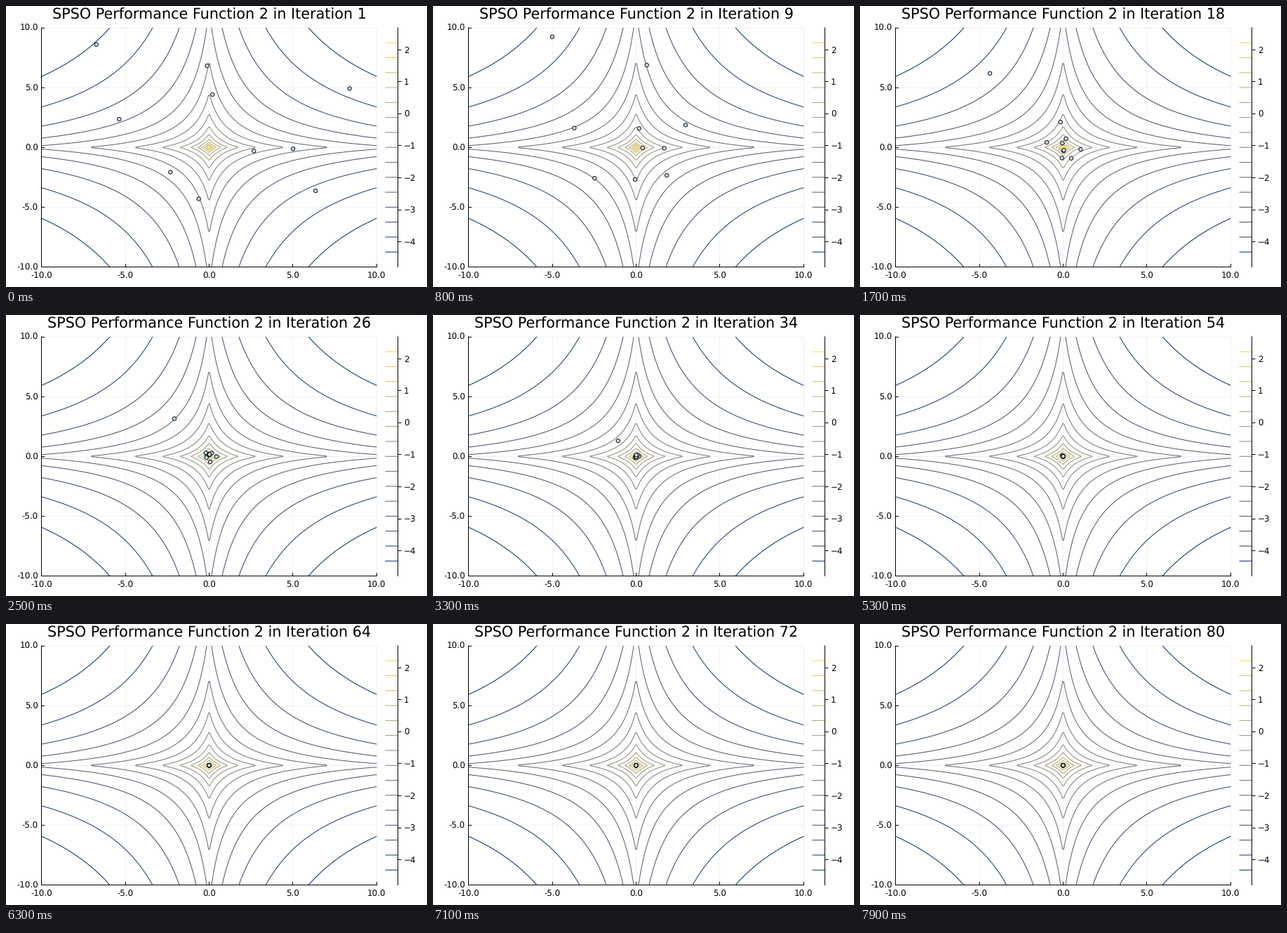
These frames come from a looping animation (600 by 400 pixels, 8 s). A matplotlib script:

```python
import numpy as np
import matplotlib.pyplot as plt
from matplotlib.animation import FuncAnimation
from matplotlib.patches import Rectangle

plt.rcParams["font.family"] = "DejaVu Sans"
plt.rcParams["text.hinting"] = "none"

W, H, DPI = 600, 400, 100
FRAMES = 80
LEFT, RIGHT, TOP, BOTTOM = 50.6, 528.4, 31, 371.5
PT = 72 / DPI  # points per pixel
TITLE_SIZE, TICK_SIZE = 20.74 * PT, 11.85 * PT


def px(x):
    return LEFT + (x + 10) / 20 * (RIGHT - LEFT)


def py(y):
    return BOTTOM - (y + 10) / 20 * (BOTTOM - TOP)


def crisp(v):
    return np.floor(v) + 0.5


fig = plt.figure(figsize=(W / DPI, H / DPI), dpi=DPI, facecolor="white")
ax = fig.add_axes([0, 0, 1, 1])
ax.set_xlim(0, W)
ax.set_ylim(H, 0)
ax.axis("off")


def line(xs, ys, color="black", z=3):
    ax.plot(xs, ys, color=color, lw=PT, zorder=z, snap=False,
            solid_capstyle="butt")


def label(x, y, s, ha):
    ax.text(x, y + 4.3, s, ha=ha, va="baseline", fontsize=TICK_SIZE)


# Grid, axes and tick labels
for v in range(-10, 11, 5):
    x, y = px(v), py(v)
    cx, cy = crisp(x), crisp(y)
    line([cx, cx], [TOP, BOTTOM], "#f0f0f0", 1)
    line([LEFT, RIGHT], [cy, cy], "#f0f0f0", 1)
    line([cx, cx], [BOTTOM, BOTTOM - 4.5])
    line([LEFT, LEFT + 4.5], [cy, cy])
    label(x, 383.7, f"{v:.1f}", "center")
    label(45.7, y, f"{v:.1f}", "right")
line([crisp(LEFT)] * 2, [30.5, 372])
line([50, RIGHT + 0.5], [crisp(BOTTOM)] * 2)

# Contours of -log(|x| + |y| + |x||y|)
g = np.linspace(-10, 10, 300)
gx, gy = np.abs(np.meshgrid(g, g))
z = -np.log(gx + gy + gx * gy)
lo, hi = z.min(), z.max()
levels = np.linspace(lo, hi, 17)[1:-1]
ax.contour(px(g), py(g), z, levels=levels, cmap="cividis", vmin=lo, vmax=hi,
           linewidths=PT, zorder=2)


# Colour key
def key_y(v):
    return TOP + (hi - v) / (hi - lo) * (BOTTOM - TOP)


for v in levels:
    line([540.5, 558], [key_y(v)] * 2, plt.cm.cividis((v - lo) / (hi - lo)))
line([558.5, 558.5], [30.5, 372])
for v in range(-4, 3):
    line([558, 563.5], [crisp(key_y(v))] * 2)
    label(567, key_y(v), str(v).replace("-", "\u2212"), "left")

# Swarm: each particle holds out for a while, then swings into the centre
START = np.array([
    (-6.73, 8.6), (-.12, 6.82), (-5.37, 2.36), (2.67, -.3), (-2.31, -2.07),
    (.2, 4.42), (8.38, 4.92), (5.01, -.12), (6.35, -3.63), (-.62, -4.3)])
hold = np.repeat([24, 13, 7], [1, 4, 5])[:, None]

rng = np.random.default_rng(4)
speed = rng.uniform(0.6, 1.1, START.shape)
reach = rng.uniform(-8, 8, START.shape)


def swarm(n):
    drift = START * np.exp(-(n / hold) ** 2)
    swing = reach * np.exp(-n / 9) * np.sin(speed * n)
    return np.clip(drift + swing, -10, 10)


# Per-particle sizes keep the markers at sub-pixel positions
dots = ax.scatter(*START.T, s=np.full(len(START), (5.4 * PT) ** 2),
                  c="#c0d9ee", edgecolors="black", linewidths=0.9 * PT,
                  zorder=5, snap=False)
dots.set_clip_path(Rectangle((LEFT, TOP), RIGHT - LEFT, BOTTOM - TOP,
                             transform=ax.transData))
title = ax.text((LEFT + RIGHT) / 2, 18.6, "", ha="center", va="baseline",
                fontsize=TITLE_SIZE)


def update(n):
    x, y = swarm(n).T
    dots.set_offsets(np.column_stack([px(x), py(y)]))
    title.set_text(f"SPSO Performance Function 2 in Iteration {n + 1}")
    return dots, title


anim = FuncAnimation(fig, update, frames=FRAMES, interval=100, repeat=True,
                     repeat_delay=0)
plt.show()
```
